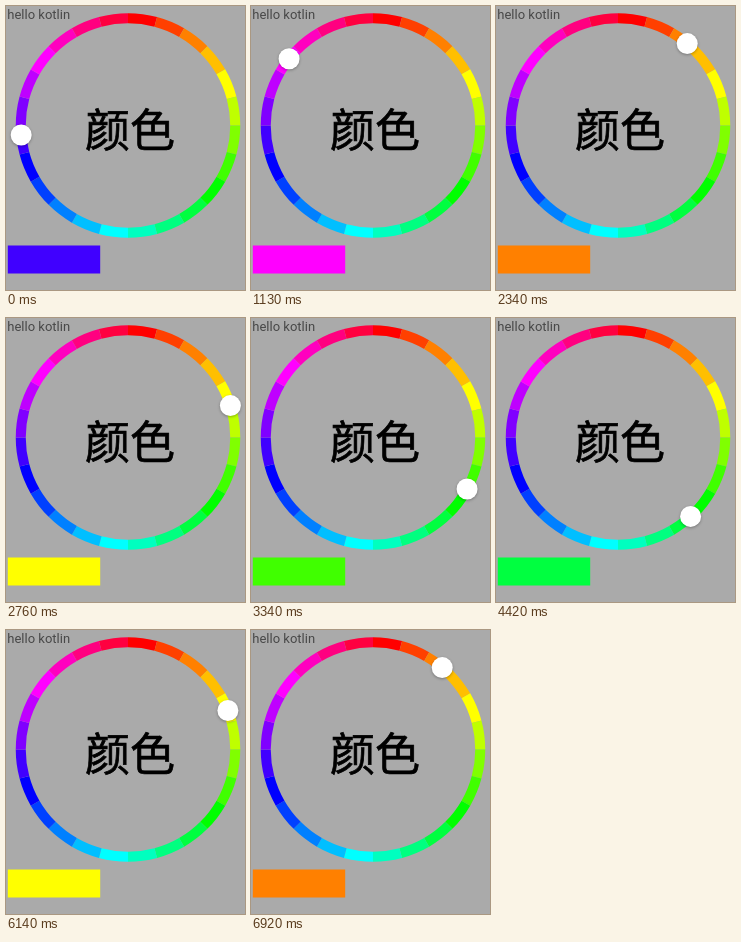
An HTML page with a canvas for the animation above (9950 ms loop, 239 by 284 pixels).

```html
<!DOCTYPE html>
<html lang="zh-CN">
<head>
<meta charset="utf-8">
<title>Colour wheel</title>
<style>
html, body { margin: 0; width: 100%; height: 100%; overflow: hidden; background: #aaa; }
canvas { display: block; width: 239px; height: 284px; }
</style>
</head>
<body>
<canvas id="stage"></canvas>
<script>
const W = 239, H = 284, LOOP = 9950, TICK = 135;
const CX = 122, CY = 119.5, R = 107.25, RING = 10, KNOB = 10.5;
const SEGMENTS = 24, STEP = 360 / SEGMENTS;

// Each swipe runs from one time to another (ms) and ends at an angle, clockwise from the top.
const REST = 264.9;
const swipes = [
  { from: 860, to: 1130, angle: 308.5 },
  { from: 1130, to: 1410, angle: 328 },
  { from: 1720, to: 1960, angle: 321 },
  { from: 1960, to: 2340, angle: 400.2 },
  { from: 2340, to: 3190, angle: 471.5 },
  { from: 3190, to: 3340, angle: 478.7 },
  { from: 3340, to: 3610, angle: 497.4 },
  { from: 4420, to: 4780, angle: 522.2 },
  { from: 5590, to: 5870, angle: 451.3 },
  { from: 5870, to: 6530, angle: 409 },
  { from: 6530, to: 6920, angle: 400.2 }
];

const canvas = document.getElementById("stage");
const ctx = canvas.getContext("2d");
const dpr = window.devicePixelRatio || 1;
canvas.width = W * dpr;
canvas.height = H * dpr;
ctx.scale(dpr, dpr);

const rad = deg => (deg - 90) * Math.PI / 180;
const hue = i => `hsl(${i * STEP}, 100%, 50%)`;
const easeOut = u => 1 - (1 - u) ** 1.5;

// The knob follows each swipe in even ticks, slowing towards its end.
function angleAt(t) {
  let angle = REST;
  for (const s of swipes) {
    if (t < s.from) break;
    const ticks = Math.round((s.to - s.from) / TICK);
    const u = Math.min(1, (t - s.from) / (s.to - s.from));
    angle += (s.angle - angle) * easeOut(Math.floor(u * ticks) / ticks);
  }
  return angle % 360;
}

function drawRing() {
  ctx.lineWidth = RING;
  for (let i = 0; i < SEGMENTS; i++) {
    ctx.strokeStyle = hue(i);
    ctx.beginPath();
    ctx.arc(CX, CY, R, rad(i * STEP), rad((i + 1) * STEP));
    ctx.stroke();
  }
}

function drawText() {
  ctx.textAlign = "left";
  ctx.fillStyle = "#484848";
  ctx.font = "13px Roboto, sans-serif";
  ctx.fillText("hello kotlin", 1.3, 13);
  ctx.textAlign = "center";
  ctx.fillStyle = ctx.strokeStyle = "#000";
  ctx.lineWidth = 0.7;
  ctx.font = '45px "Noto Sans CJK SC", "Noto Sans CJK", sans-serif';
  ctx.fillText("颜色", 124, 140.5);
  ctx.strokeText("颜色", 124, 140.5);
}

function drawKnob(angle) {
  const x = CX + R * Math.cos(rad(angle));
  const y = CY + R * Math.sin(rad(angle));
  ctx.save();
  ctx.shadowColor = "rgba(0, 0, 0, 0.3)";
  ctx.shadowBlur = 3 * dpr;
  ctx.shadowOffsetY = dpr;
  ctx.fillStyle = "#fff";
  ctx.beginPath();
  ctx.arc(x, y, KNOB, 0, 2 * Math.PI);
  ctx.fill();
  ctx.restore();
}

function draw(t) {
  const angle = angleAt(t);
  ctx.fillStyle = "#aaa";
  ctx.fillRect(0, 0, W, H);
  drawText();
  drawRing();
  ctx.fillStyle = hue(Math.floor(angle / STEP));
  ctx.fillRect(1.8, 239.5, 92.4, 28);
  drawKnob(angle);
}

const begin = performance.now();
function tick() {
  draw((performance.now() - begin) % LOOP);
  requestAnimationFrame(tick);
}
tick();
</script>
</body>
</html>
```
